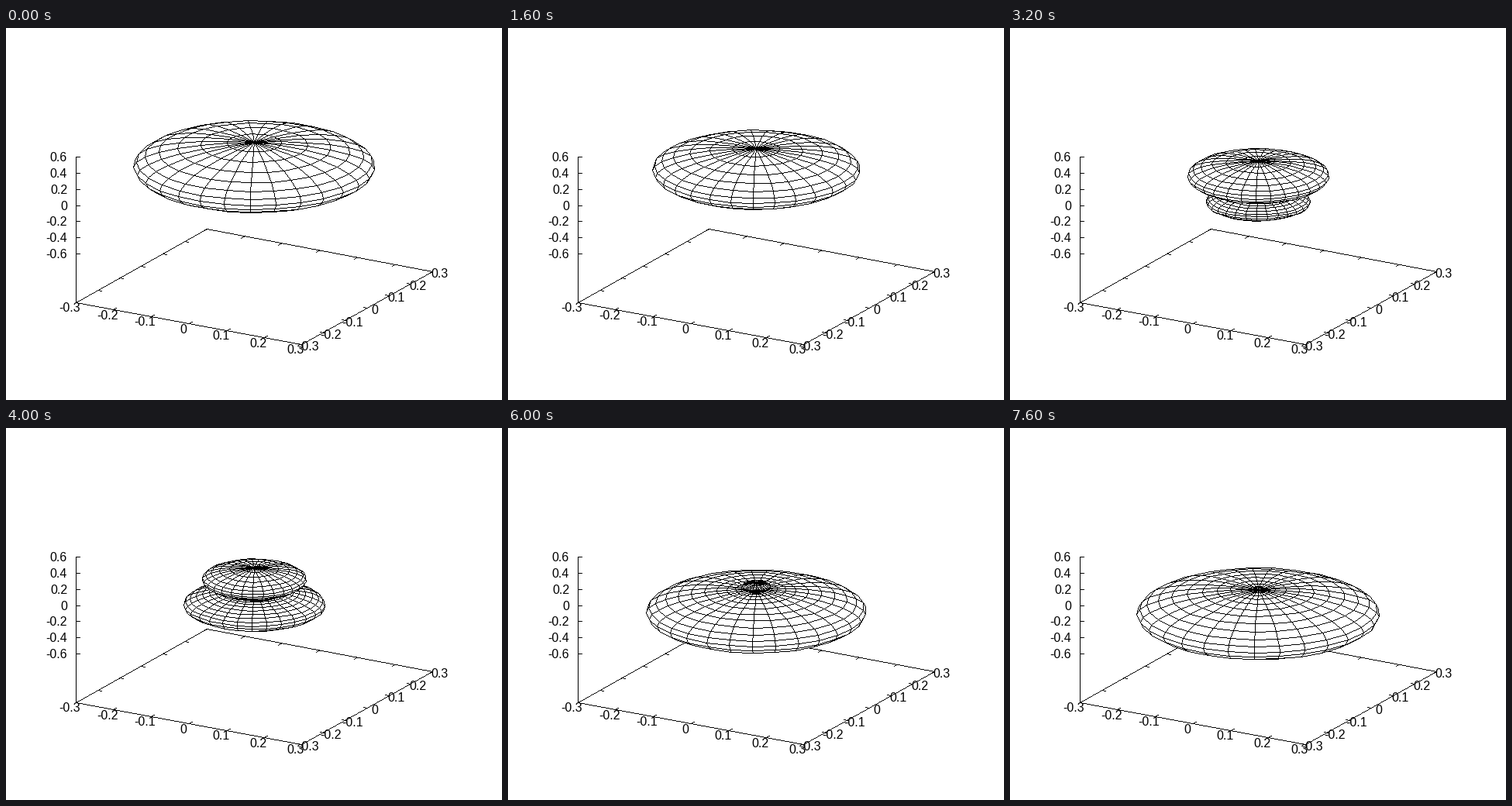
A matplotlib script that plays this animation: 640x480 px, repeating every 8000 ms.

```python
import numpy as np
import matplotlib.pyplot as plt
from matplotlib.animation import FuncAnimation

W, H, DPI = 640, 480, 100
FRAMES, INTERVAL = 20, 400
WHITE, BLACK = 255, 0
LIMIT, FLOOR, MIDDLE = 0.3, -1.2, -0.3
X_SCALE, Y_SCALE = 563.4, 363.2
COS30, SIN30 = np.cos(np.pi / 6), 0.5
Y00, Y10 = np.sqrt(1 / (4 * np.pi)), np.sqrt(3 / (4 * np.pi))

fig = plt.figure(figsize=(W / DPI, H / DPI), dpi=DPI, facecolor="white")
ax = fig.add_axes([0, 0, 1, 1])
ax.axis("off")


def project(x, y, z):
    """Map space to whole screen pixels, plus nearness to the viewer."""
    across = x * COS30 + y * SIN30
    away = y * COS30 - x * SIN30
    height = (z - MIDDLE) / 3
    up = 0.5 * away + COS30 * height
    screen = np.stack([W // 2 + np.trunc(X_SCALE * across),
                       H // 2 - np.trunc(Y_SCALE * up)], axis=-1)
    return screen.astype(int), 0.5 * height - COS30 * away


def draw_line(canvas, start, end):
    """Bresenham line, the same pixels whichever end comes first."""
    (x0, y0), (x1, y1) = start, end
    steep = abs(y1 - y0) > abs(x1 - x0)
    if steep:
        x0, y0, x1, y1 = y0, x0, y1, x1
    if x0 > x1:
        x0, y0, x1, y1 = x1, y1, x0, y0
    length, rise = x1 - x0, y1 - y0
    step = np.arange(length + 1)
    minor = (2 * abs(rise) * step + length) // max(2 * length, 1)
    major, minor = x0 + step, y0 + (minor if rise > 0 else -minor)
    if steep:
        canvas[major, minor] = BLACK
    else:
        canvas[minor, major] = BLACK


def draw_quad(canvas, corners):
    """White cell with a black outline; cells facing away are skipped."""
    points = corners.tolist()
    edges = list(zip(points, points[1:] + points[:1]))
    if sum(a[0] * b[1] - b[0] * a[1] for a, b in edges) > 0:
        return
    (left, top), (right, bottom) = corners.min(axis=0), corners.max(axis=0)
    rows = np.arange(top, bottom + 1)[:, None]
    cols = np.arange(left, right + 1)
    inside = np.ones((rows.size, cols.size), bool)
    for (ax_, ay), (bx, by) in edges:
        inside &= (bx - ax_) * (rows - ay) <= (by - ay) * (cols - ax_)
    canvas[top:bottom + 1, left:right + 1][inside] = WHITE
    for a, b in edges:
        draw_line(canvas, a, b)


def label(x, y, value, align="center"):
    ax.text(x, y + 5.5, f"{value:.1f}" if value else "0", ha=align,
            va="baseline", family="Liberation Sans", fontsize=16 * 72 / DPI)


def draw_axes(canvas):
    def floor_point(x, y):
        return project(x, y, FLOOR)[0]

    corners = [floor_point(sx * LIMIT, sy * LIMIT)
               for sx, sy in ((-1, -1), (1, -1), (1, 1), (-1, 1))]
    lines = list(zip(corners, corners[1:] + corners[:1]))
    lines.append((corners[0], project(-LIMIT, -LIMIT, 0.6)[0]))

    x_tick, y_tick = np.array([5, 1]), np.array([4, -2])
    for i in range(-3, 4):
        v = i / 10
        front, back = floor_point(v, -LIMIT), floor_point(v, LIMIT)
        west, east = floor_point(-LIMIT, v), floor_point(LIMIT, v)
        lines += [(front, front + y_tick), (back, back - y_tick),
                  (west, west + x_tick), (east, east - x_tick)]
        label(front[0] - 8, front[1] + 6.5, v)
        label(east[0] + 9, east[1] + 2, v)

        level = project(-LIMIT, -LIMIT, 2 * v)[0]
        lines.append((level, level + [5, 0]))
        label(78.5, level[1], 2 * v, "right")

    for start, end in lines:
        draw_line(canvas, start, end)


def quads(grid):
    """Group a grid of points into its four-cornered cells."""
    cells = np.stack([grid[:-1, :-1], grid[1:, :-1],
                      grid[1:, 1:], grid[:-1, 1:]], axis=2)
    return cells.reshape(-1, 4, *grid.shape[2:])


theta, azimuth = np.meshgrid(np.linspace(0, np.pi, 30),
                             np.linspace(0, 2 * np.pi, 30), indexing="ij")

backdrop = np.full((H, W), WHITE, np.uint8)
draw_axes(backdrop)
picture = ax.imshow(backdrop, cmap="gray", vmin=BLACK, vmax=WHITE,
                    interpolation="nearest", aspect="auto")


def update(frame):
    # Density of two superposed harmonics drifting out of phase.
    phase = 2 * np.pi * (frame + 1) / 40
    p = Y10 * np.cos(theta)
    r = Y00**2 + p**2 + 2 * Y00 * p * np.cos(phase)
    rho = r * np.sin(theta)
    screen, near = project(rho * np.cos(azimuth), rho * np.sin(azimuth),
                           r * np.cos(theta))
    order = np.argsort(quads(near).mean(axis=1), kind="stable")
    canvas = backdrop.copy()
    for corners in quads(screen)[order]:
        draw_quad(canvas, corners)
    picture.set_data(canvas)
    return (picture,)


anim = FuncAnimation(fig, update, frames=FRAMES, interval=INTERVAL,
                     repeat=True, repeat_delay=0, blit=False)
plt.show()
```
